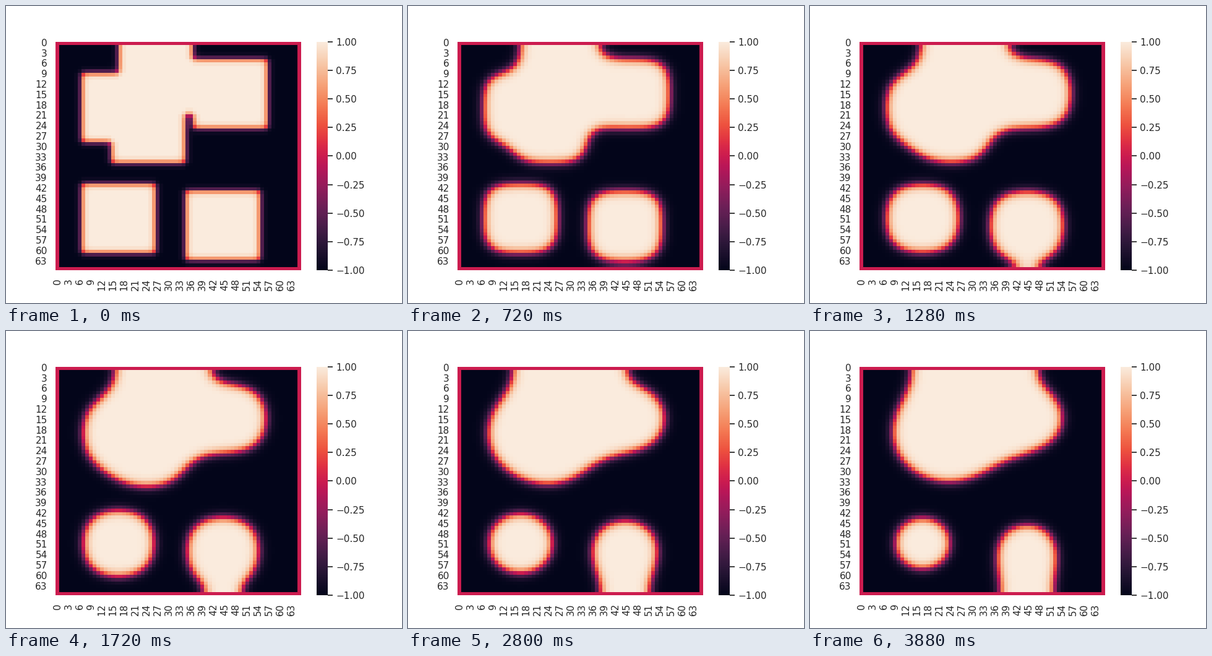
Recreate the animation shown at these times as a matplotlib script. Size 640 by 480 pixels, loop 4 s.

```python
import numpy as np
import matplotlib.pyplot as plt
from matplotlib.animation import FuncAnimation
from matplotlib.colors import LinearSegmentedColormap

FRAMES, INTERVAL = 100, 40
N, BLOCK = 64, 20
DT, SUBSTEPS = 0.05, 8
INK = "0.15"

# Top-left corners (row, column) of the initial squares
CORNERS = [(0, 16), (8, 6), (14, 14), (4, 36), (40, 6), (42, 34)]


def rocket():
    scales = [
        "#03051A #221331 #451C47 #6A1F56 #921C5B #B91657 "
        "#D92847 #ED513E #F47C56 #F6A47B #F7C9AA #FAEBDD",
        "#03051A #35193E #701F57 #AD1759 #E13342 #F37651 #F6B48F #FAEBDD",
        "#03051A #611F53 #CB1B4F #F4875E #FAEBDD",
    ]
    stops = {}
    for scale in scales:
        colors = scale.split()
        stops.update(zip(np.linspace(0, 1, len(colors)), colors))
    return LinearSegmentedColormap.from_list("rocket", sorted(stops.items()), N=256)


def start():
    u = -np.ones((N, N))
    for r, c in CORNERS:
        u[r:r + BLOCK, c:c + BLOCK] = 1
    return u


def step(u):
    """One explicit Allen-Cahn step with zero-flux walls."""
    p = np.pad(u, 1, mode="edge")
    lap = p[:-2, 1:-1] + p[2:, 1:-1] + p[1:-1, :-2] + p[1:-1, 2:] - 4 * u
    return u + DT * (lap + u - u**3)


def simulate():
    u, states = start(), []
    for _ in range(FRAMES):
        for _ in range(SUBSTEPS):
            u = step(u)
        states.append(np.pad(u, 1))  # the outer ring is shown as zero
    return states


plt.rcParams.update({
    "font.family": "DejaVu Sans",
    "xtick.labelsize": 11, "ytick.labelsize": 11,
    "xtick.color": INK, "ytick.color": INK,
})

states = simulate()
fig, ax = plt.subplots(figsize=(6.4, 4.8), dpi=100)
mesh = ax.pcolormesh(states[0], cmap=rocket(), vmin=-1, vmax=1)
ax.set(xlim=(0, N + 2), ylim=(N + 2, 0))
ax.spines[:].set_visible(False)

bar = fig.colorbar(mesh, ax=ax)
bar.outline.set_linewidth(0)
bar.ax.tick_params(length=6, width=1.25, pad=3.5)

ticks = np.arange(0, N + 2, 3)
ax.set_xticks(ticks + 0.5, ticks, rotation="vertical")
ax.set_yticks(ticks + 0.5, ticks, va="center")
ax.tick_params(length=0, pad=9.5)


def update(i):
    mesh.set_array(states[i])
    return [mesh]


anim = FuncAnimation(fig, update, frames=FRAMES, interval=INTERVAL,
                     repeat=True, repeat_delay=0)
plt.show()
```
